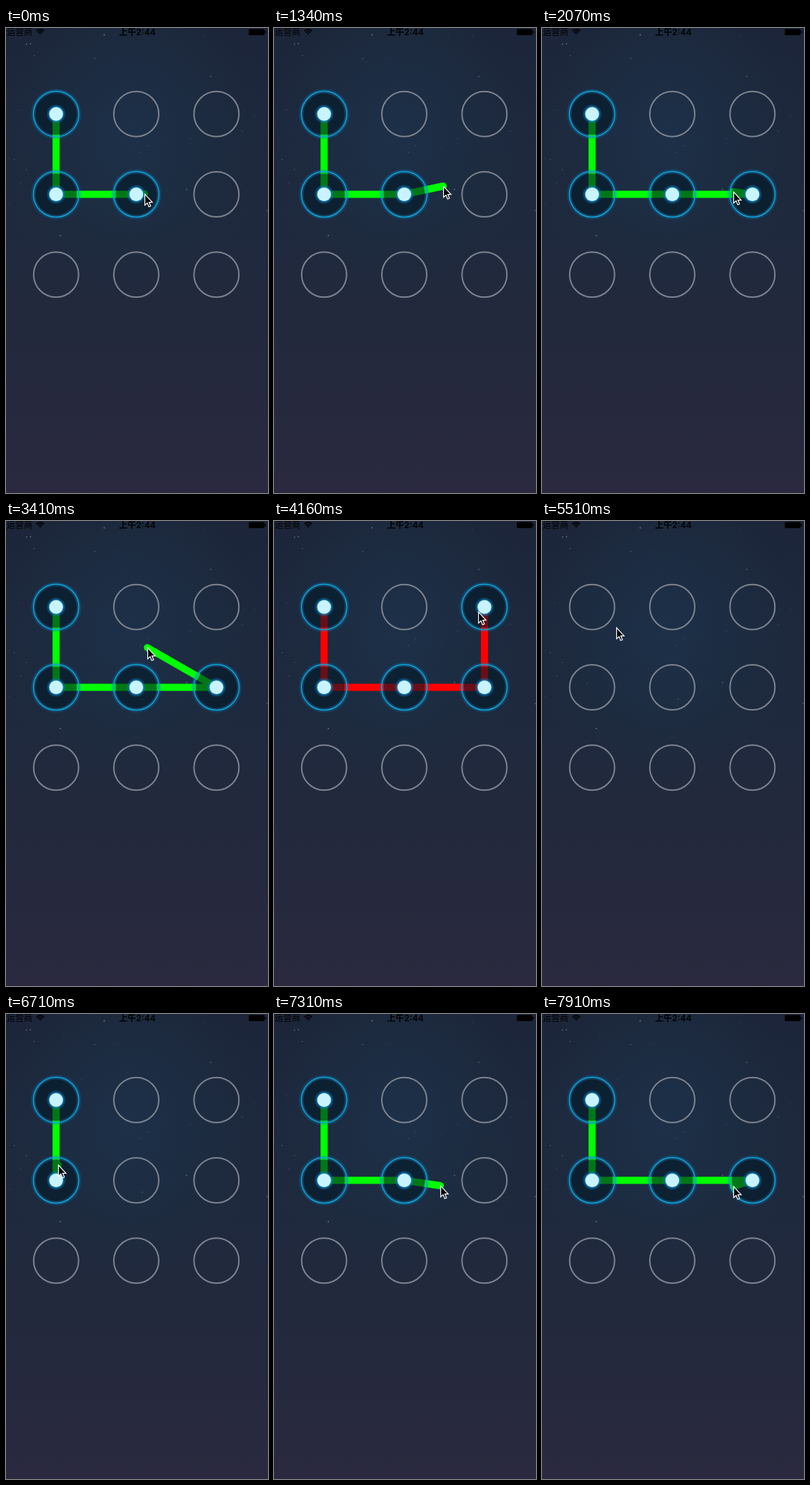
Recreate the animation shown at these times as an HTML page with a canvas. Size 367 by 650 pixels, loop 8000 ms.

```html
<!DOCTYPE html>
<html lang="zh">
<head>
<meta charset="utf-8">
<style>
  html, body { margin: 0; width: 100%; height: 100%; overflow: hidden; background: #1f293d; }
  canvas { display: block; width: 367px; height: 650px; }
</style>
</head>
<body>
<canvas id="stage" width="367" height="650"></canvas>
<script>
const W = 367, H = 650, LOOP = 8000, TAU = Math.PI * 2;
const PITCH = 112.3, RADIUS = 31.5, STEP = 150;
const ctx = document.getElementById('stage').getContext('2d');

const nodes = Array.from({ length: 9 }, (_, i) => ({
  x: 70.2 + PITCH * (i % 3),
  y: 120.2 + PITCH * Math.floor(i / 3)
}));

// Key points of the pointer: [time, x, y]
const path = [
  [0, 194, 232], [590, 197, 232], [1040, 229, 182], [1640, 244, 259],
  [2070, 268, 229], [2370, 236, 252], [2810, 195, 200], [3110, 198, 178],
  [3410, 198, 177], [4010, 286, 127], [4460, 286, 127], [4910, 165, 180],
  [5210, 104, 149], [5660, 104, 149], [6110, 75, 114], [6260, 75, 114],
  [6710, 73, 211], [7310, 233, 240], [7610, 270, 227], [7910, 268, 241]
];

const gestures = [
  { press: 0, release: 4160, clear: 5510, picked: [0, 3, 4] },
  { press: 6410, release: LOOP, clear: LOOP, picked: [] }
];

// The picture refreshes every STEP ms; the rhythm restarts at each of these times
const restarts = [-10, 1770, 2960];

function refreshTime(time) {
  const base = restarts.filter(r => r <= time).pop();
  return Math.max(0, base + Math.floor((time - base) / STEP) * STEP);
}

function slope(i, axis) {
  if (i < 1 || i >= path.length - 1) return 0;
  const [a, b, c] = path.slice(i - 1, i + 2);
  const before = (b[axis] - a[axis]) / (b[0] - a[0]);
  const after = (c[axis] - b[axis]) / (c[0] - b[0]);
  return before * after > 0 ? 2 * before * after / (before + after) : 0;
}

// Monotone cubic through the key points
function pointerAt(t) {
  const i = Math.max(0, path.findLastIndex(p => p[0] <= t));
  const a = path[i], b = path[i + 1];
  if (!b) return { x: a[1], y: a[2] };
  const span = b[0] - a[0], k = (t - a[0]) / span;
  const ease = k * k * (3 - 2 * k);
  const along = axis => Math.round(
    a[axis] + (b[axis] - a[axis]) * ease +
    span * k * (1 - k) * (slope(i, axis) * (1 - k) - slope(i + 1, axis) * k));
  return { x: along(1), y: along(2) };
}

function pickedAt(t, gesture) {
  const picked = [...gesture.picked];
  for (let s = gesture.press; s <= Math.min(t, gesture.release); s += 10) {
    if (refreshTime(s) !== s) continue;
    const p = pointerAt(s);
    const hit = nodes.findIndex(n => Math.hypot(n.x - p.x, n.y - p.y) < RADIUS);
    if (hit >= 0 && !picked.includes(hit)) picked.push(hit);
  }
  return picked;
}

function disc(c, x, y, r, fill) {
  c.beginPath();
  c.arc(x, y, r, 0, TAU);
  c.fillStyle = fill;
  c.fill();
}

function ring(c, x, y, r, width, stroke) {
  c.beginPath();
  c.arc(x, y, r, 0, TAU);
  c.lineWidth = width;
  c.strokeStyle = stroke;
  c.stroke();
}

function fade(gradient, ...colors) {
  colors.forEach((color, i) => gradient.addColorStop(i / (colors.length - 1), color));
  return gradient;
}

function drawSky(c) {
  c.fillStyle = fade(c.createLinearGradient(0, 0, 0, H),
    '#1c2539', '#1d283d', '#1e293d', '#22293d', '#26293d', '#2a293f');
  c.fillRect(0, 0, W, H);
  c.save();
  c.translate(172, 150);
  c.scale(.8, 1);
  disc(c, 0, 0, 230, fade(c.createRadialGradient(0, 0, 0, 0, 0, 230),
    'rgba(29,50,76,.8)', 'rgba(28,48,70,.55)', 'rgba(28,44,62,0)'));
  c.restore();
}

function drawStars(c) {
  let seed = 17;
  const random = () => (seed = seed * 16807 % 2147483647) / 2147483647;
  for (let i = 0; i < 80; i++) {
    const glow = random() ** 4;
    disc(c, random() * W, random() * 300, .5 + glow * .5,
      `rgba(160,182,204,${.12 + glow * .5})`);
  }
}

function drawStatusBar(c) {
  c.fillStyle = c.strokeStyle = '#000';
  c.font = '12px "Noto Sans CJK SC", "Noto Sans CJK", sans-serif';
  c.fillText('运营商', 1, 10);
  c.textAlign = 'center';
  c.font = '600 12px Inter, "Noto Sans CJK SC", "Noto Sans CJK", sans-serif';
  c.fillText('上午2:44', 184, 10);
  c.lineWidth = 1.9;
  for (const r of [1.2, 4.3, 7.4]) {
    c.beginPath();
    c.arc(48, 9.5, r, -Math.PI * .75, -Math.PI * .25);
    c.stroke();
  }
  c.beginPath();
  c.roundRect(340, 1.5, 22, 8.5, 1.5);
  c.fill();
  c.fillRect(362.5, 4, 1.5, 3.5);
}

function makeBackdrop() {
  const layer = document.createElement('canvas');
  layer.width = W;
  layer.height = H;
  const c = layer.getContext('2d');
  drawSky(c);
  drawStars(c);
  drawStatusBar(c);
  return layer;
}

function drawTrail(points, color) {
  ctx.beginPath();
  points.forEach(p => ctx.lineTo(p.x, p.y));
  ctx.lineWidth = 10;
  ctx.lineCap = ctx.lineJoin = 'round';
  ctx.strokeStyle = color;
  ctx.stroke();
}

function drawSelected({ x, y }) {
  disc(ctx, x, y, 29, 'rgba(0,2,6,.53)');
  disc(ctx, x, y, 36, fade(ctx.createRadialGradient(x, y, 28, x, y, 36),
    'rgba(0,110,165,.12)', 'rgba(0,135,200,.5)', 'rgba(0,130,200,0)'));
  ring(ctx, x, y, RADIUS + .3, 1.2, '#12a8da');
  disc(ctx, x, y, 14, fade(ctx.createRadialGradient(x, y, 9, x, y, 14),
    'rgba(20,150,220,.9)', 'rgba(15,125,190,.45)', 'rgba(10,100,170,0)'));
  disc(ctx, x, y, 9.6, '#c9f4ff');
}

function drawPointer({ x, y }) {
  ctx.beginPath();
  [[.5, .3], [.5, 15.7], [3.9, 12.5], [6.2, 18], [8.7, 17], [6.4, 11.6], [11, 11.6]]
    .forEach(([dx, dy]) => ctx.lineTo(x + dx, y + dy));
  ctx.closePath();
  ctx.fillStyle = '#000';
  ctx.fill();
  ctx.lineWidth = 1.2;
  ctx.lineJoin = 'miter';
  ctx.strokeStyle = '#fff';
  ctx.stroke();
}

const backdrop = makeBackdrop();

function draw(time) {
  const t = refreshTime(time);
  const pointer = pointerAt(t);
  const gesture = gestures.find(g => t >= g.press && t < g.clear);
  const picked = gesture ? pickedAt(t, gesture) : [];
  ctx.drawImage(backdrop, 0, 0);
  if (gesture) {
    const failed = t >= gesture.release;
    const trail = picked.map(i => nodes[i]);
    drawTrail(failed ? trail : [...trail, pointer], failed ? '#f00' : '#0f0');
  }
  nodes.forEach((n, i) => {
    if (picked.includes(i)) drawSelected(n);
    else ring(ctx, n.x, n.y, RADIUS, 2, '#7d838f');
  });
  drawPointer(pointer);
}

const start = performance.now();
function tick() {
  draw((performance.now() - start) % LOOP);
  requestAnimationFrame(tick);
}
tick();
</script>
</body>
</html>
```
